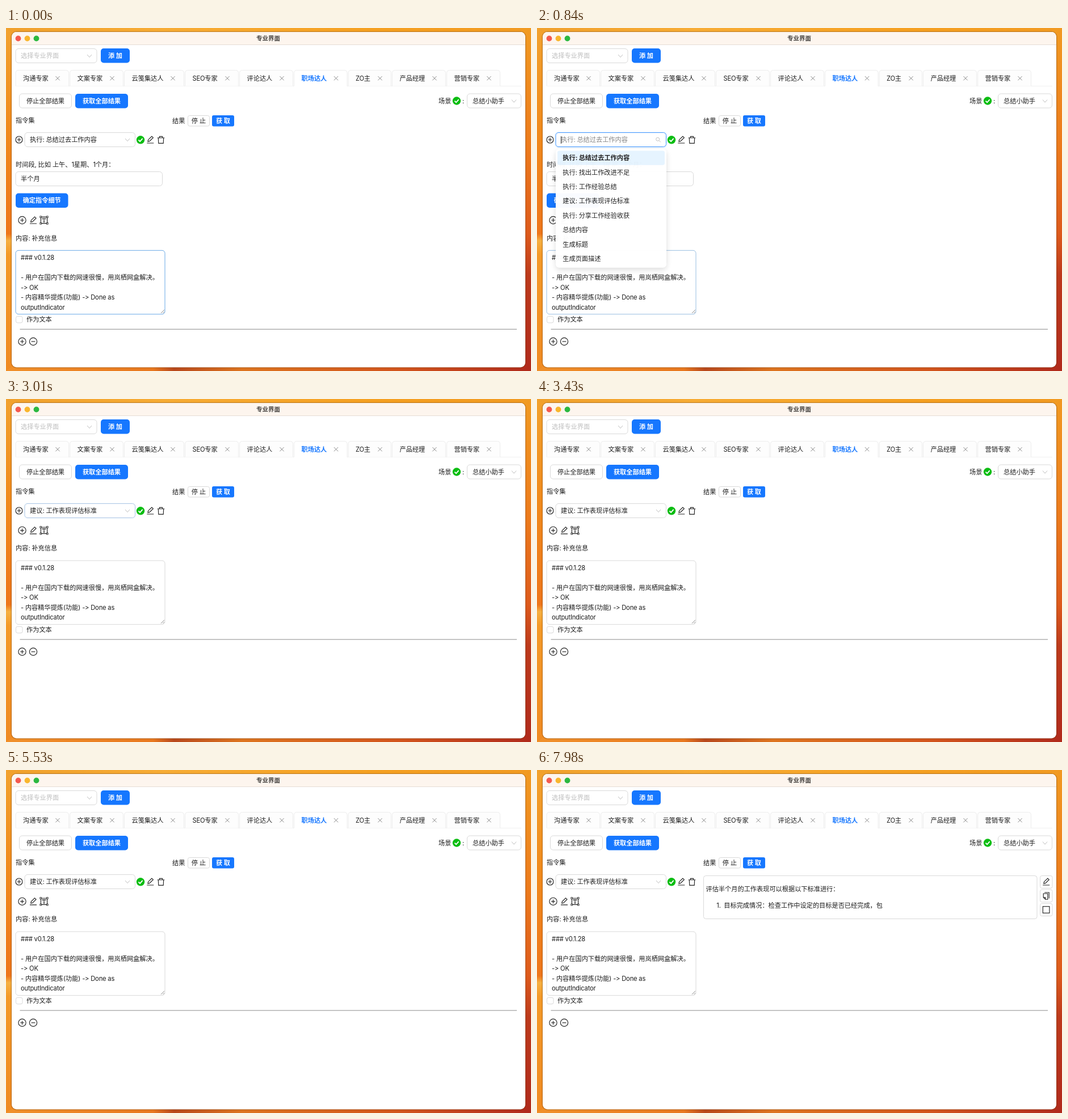
These frames come from a looping animation (925 by 605 pixels, 8000 ms). An HTML page:

```html
<!DOCTYPE html>
<html lang="zh-CN">
<head>
<meta charset="utf-8">
<style>
html, body { margin: 0; width: 100%; height: 100%; overflow: hidden; background: #f39a20; }
svg { display: block; width: 925px; height: 605px; }
text { font: 11.2px Inter, "Noto Sans CJK SC", "Noto Sans CJK", sans-serif; fill: #1c1c1c; white-space: pre; }
tspan { letter-spacing: -.2px; }
.b { font-weight: 700; }
.w { font-weight: 700; fill: #fff; }
.blue { font-weight: 700; fill: #1677ff; }
.dim { fill: #bfbfbf; }
.title { font-size: 10.5px; font-weight: 700; fill: #464340; }
.m { text-anchor: middle; }
.box { fill: #fff; stroke: #d9d9d9; }
.ln { fill: none; stroke: #222; stroke-width: 1.15; }
.thin { fill: none; stroke: #8a8a8a; stroke-width: 1; }
.pale { fill: none; stroke: #bfbfbf; stroke-width: 1; }
#menu { filter: drop-shadow(0 4px 5px rgba(0,0,0,.09)) drop-shadow(0 3px 8px rgba(0,0,0,.06)); }
</style>
</head>
<body>
<svg id="stage" viewBox="0 0 925 605"></svg>
<script>
const stage = document.getElementById('stage');
const LOOP = 8000, SHIFT = -107.2, BLUE = '#1677ff';

// Markup helpers: text takes its vertical centre, icons their centre point.
const text = (x, y, s, cls = '', id = '') =>
  `<text x="${x}" y="${y + 4.1}" class="${cls}" ${id && `id="${id}"`}>${runs(s)}</text>`;
const runs = s => s.replace(/[ -~]+/g, r => `<tspan>${r.replace('>', '&gt;')}</tspan>`);
const rect = (x, y, w, h, r, attrs = 'class="box"') =>
  `<rect x="${x}" y="${y}" width="${w}" height="${h}" rx="${r}" ${attrs}/>`;
const path = (d, cls = 'ln') => `<path d="${d}" class="${cls}"/>`;
const at = (x, y, s) => `<g transform="translate(${x} ${y})">${s}</g>`;
const button = (x, y, w, h, s, primary, r = 5) =>
  rect(x, y, w, h, r, primary ? `fill="${BLUE}"` : undefined) +
  text(x + w / 2, y + h / 2, s, primary ? 'w m' : 'm');

const ring = r => `<circle r="${r}" class="ln"/>`;
const plus = (x, y, r = 6.6) => at(x, y, ring(r) + path('M-3.4 0H3.4M0-3.4V3.4'));
const minus = (x, y) => at(x, y, ring(6.6) + path('M-3.4 0H3.4'));
const chevron = (x, y) => at(x, y, path('M-4-2L0 2.6L4-2', 'pale'));
const cross = (x, y) => at(x, y, path('M-3.6-3.6L3.6 3.6M3.6-3.6L-3.6 3.6', 'thin'));
const check = (x, y) => at(x, y, '<circle r="7.2" fill="#0bbd12"/>' +
  '<path d="M-3.5 .2L-.9 2.8L3.6-2.4" fill="none" stroke="#fff" stroke-width="1.8"/>');
const pencil = (x, y) => at(x, y, path('M-6 6H6M-4.3 3.2L-3.7 .2L2.6-6L5-3.6L-1.3 2.6Z'));
const trash = (x, y) => at(x, y, path('M-6.2-3.6H6.2M-2.6-3.8V-6H2.6V-3.8M-4.7-3.4L-4.2 6H4.2L4.7-3.4'));
const textIcon = (x, y) => at(x, y, path('M-5.6-5.6H5.6V5.6H-5.6ZM-2.8-1.6V-3H2.8V-1.6M0-3V3.2M-1.4 3.2H1.4') +
  [[-1, -1], [1, -1], [-1, 1], [1, 1]].map(([a, b]) =>
    rect(a * 5.8 - 1.3, b * 5.8 - 1.3, 2.6, 2.6, 0, 'fill="#fff" stroke="#222" stroke-width=".9"')).join(''));
const copy = (x, y) => at(x, y, path('M-3-6H5V4.5M-5-4H2.6V6.2H-1.4L-5 2.8ZM-5 2.8H-1.4V6.2'));

const gradient = (id, vertical, stops) =>
  `<linearGradient id="${id}" x1="0" y1="0" x2="${vertical ? 0 : 1}" y2="${vertical ? 1 : 0}">` +
  stops.map(([o, c]) => `<stop offset="${o}" stop-color="${c}"/>`).join('') + '</linearGradient>';

const wallpaper = () => '<defs>' +
  gradient('gt', 0, [[0, '#f0a02c'], [.3, '#f7ac35'], [.7, '#f5a021'], [1, '#f19a22']]) +
  gradient('gl', 1, [[0, '#f2a22e'], [.3, '#f08a1c'], [.6, '#ee761b'], [.62, '#f6b041'], [.66, '#f49a28'], [1, '#ef8a22']]) +
  gradient('gr', 1, [[0, '#f19a22'], [.35, '#ec7a1c'], [.6, '#dd5a1c'], [.72, '#bd3a1c'], [1, '#b02a1c']]) +
  gradient('gb', 0, [[0, '#f0902a'], [.28, '#e8781f'], [.32, '#b8481c'], [.45, '#dd741f'], [.75, '#d2541c'], [1, '#b02a1c']]) +
  '</defs>' +
  rect(0, 0, 925, 20, 0, 'fill="url(#gt)"') + rect(0, 590, 925, 15, 0, 'fill="url(#gb)"') +
  '<path d="M0 0L20 16V590L0 605Z" fill="url(#gl)"/><path d="M925 0L905 16V590L925 605Z" fill="url(#gr)"/>';

const frame = () =>
  rect(9.5, 6.5, 906, 592.5, 9, 'fill="none" stroke="#6b3a10" stroke-opacity=".35" stroke-width="1.5"') +
  rect(10, 7, 905, 591.5, 8.5, 'fill="#fff"') +
  '<path d="M10 30V15.5A8.5 8.5 0 0 1 18.500 7H906.500A8.5 8.5 0 0 1 915 15.500V30Z" fill="#fdf5ee"/>' +
  '<path d="M10 29.500H915" stroke="#e6ddd6"/>' +
  ['#f4594f', '#f9b62d', '#2bb840'].map((c, i) => `<circle cx="${21.5 + 16 * i}" cy="18.500" r="4.900" fill="${c}"/>`).join('') +
  text(462, 18, '专业界面', 'title m');

const tabList = [[17, 93.5, '沟通专家'], [112.5, 94, '文案专家'], [208.5, 105, '云笺集达人'], [315.5, 94, 'SEO专家'],
  [411.5, 94, '评论达人'], [507.5, 93.5, '职场达人'], [603, 75.5, 'ZO主'], [680.5, 94, '产品经理'], [776.5, 94, '营销专家']];
const tabs = () => path('M17 102.5H507.500M601 102.500H908', '" stroke="#f0f0f0') +
  tabList.map(([x, w, s]) => {
    const active = s === '职场达人';
    return `<path d="M${x} 102.500V79.500Q${x} 74.500 ${x + 5} 74.500H${x + w - 5}Q${x + w} 74.500 ${x + w} 79.500V102.500" ` +
      `fill="${active ? '#fff' : '#fdfdfd'}" stroke="#ececec"/>` +
      text(x + 13, 88.5, s, active ? 'blue' : '') + cross(x + w - 19.5, 88.7);
  }).join('');

const header = () =>
  rect(17, 36.5, 143, 25, 5) + text(26, 49, '选择专业界面', 'dim') + chevron(147, 49) +
  button(167, 36, 51, 25.5, '添 加', true) + tabs() +
  button(23.5, 116, 92, 25, '停止全部结果') + button(122, 116, 93, 25.5, '获取全部结果', true) +
  text(762, 128.5, '场景') + check(794, 128.5) + text(804, 128.5, ':') +
  rect(812.5, 116, 95, 25, 5) + text(822, 128.5, '总结小助手') + chevron(895, 128.5) +
  text(17, 163, '指令集') + text(293, 163.5, '结果') +
  button(320.5, 154.5, 38, 18.5, '停 止', false, 3) +
  rect(363, 154, 39, 19.5, 3, `id="wave" fill="${BLUE}"`) +
  button(363, 154, 39, 19.5, '获 取', true, 3);

const command = () => plus(23, 197, 6) +
  rect(32, 183.5, 196.5, 27.5, 6, 'id="glow" fill="none" stroke="#0591ff" stroke-width="2"') +
  rect(33, 184.5, 194.5, 25, 5, 'class="box" id="pick"') + text(42, 197, '', '', 'value') +
  rect(42, 191, 1, 13, 0, 'id="caret" fill="#222"') +
  `<g id="arrow">${chevron(214, 197)}</g>` +
  `<g id="find">${at(213.5, 197, '<circle cx="-.8" cy="-.8" r="3" class="pale"/>' + path('M1.500 1.500L4.300 4.300', 'pale'))}</g>` +
  check(237, 197.3) + pencil(254.3, 197) + trash(273, 197.3);

const period = () => `<g id="period">` + text(17, 240.5, '时间段, 比如 上午、1星期、1个月：') +
  rect(17, 253.5, 258.5, 25, 5) + text(26, 266, '半个月') +
  button(17, 291.5, 92.5, 25.5, '确定指令细节', true) + '</g>';

const notes = ['### v0.1.28', '', '- 用户在国内下载的网速很慢，用岚栖网盒解决。', '-> OK',
  '- 内容精华提炼(功能) -> Done as', 'outputIndicator'];
const content = () => '<g id="content">' + plus(28.5, 339) + pencil(48, 339) + textIcon(67, 339) +
  text(17, 370.5, '内容: 补充信息') + rect(17, 392.3, 263, 112.5, 5, 'class="box" id="area"') +
  notes.map((s, i) => text(26, 405 + 17.5 * i, s)).join('') +
  path('M273 503L279 497M276.500 503L279 500.500', 'thin') +
  rect(17.5, 508.5, 11.5, 11.5, 3) + text(36, 514.3, '作为文本') +
  path('M24.5 531.300H900', 'thin') + plus(28.5, 553) + minus(48, 553) + '</g>';

const options = ['执行: 总结过去工作内容', '执行: 找出工作改进不足', '执行: 工作经验总结', '建议: 工作表现评估标准',
  '执行: 分享工作经验收获', '总结内容', '生成标题', '生成页面描述'];
const menu = () => '<g id="menu">' + rect(33, 213.2, 195, 210.6, 6, 'fill="#fff"') +
  rect(36, 216.4, 189, 25.5, 3.5, 'fill="#e6f4ff"') +
  rect(36, 292.9, 189, 25.5, 3.5, 'id="hover" fill="#f4f4f4"') +
  options.map((s, i) => text(45.3, 229.2 + 25.52 * i, s, i ? '' : 'b')).join('') + '</g>';

const result = () => '<g id="result">' + rect(293.5, 186.5, 587.5, 76, 4, 'class="box" id="panel"') +
  text(297.5, 210, '', '', 'intro') + text(316.3, 238.8, '1.', '', 'bullet') + text(329.3, 238.8, '', '', 'item') +
  [186.5, 211, 235.5].map(y => rect(886.5, y, 21.5, 22, 3)).join('') +
  pencil(897.2, 197) + copy(897.2, 222) + rect(891.3, 240.7, 11.6, 11.6, 0, 'class="ln"') + '</g>';

stage.innerHTML = wallpaper() + frame() + header() + command() + period() + content() + menu() + result();
const el = {};
stage.querySelectorAll('[id]').forEach(n => el[n.id] = n);

const ramp = (t, a, b) => Math.min(1, Math.max(0, (t - a) / (b - a)));
const quint = p => 1 - (1 - p) ** 5;
const circ = p => Math.sqrt(1 - (1 - p) ** 2);
const mix = (a, b, p) => `rgb(${a.map((v, i) => Math.round(v + (b[i] - v) * p))})`;
const GREY = [217, 217, 217], FOCUS = [64, 150, 255], SOFT = [105, 168, 230], INK = [28, 28, 28], FAINT = [191, 191, 191];
const show = (n, on) => n.setAttribute('display', on ? 'inline' : 'none');
const write = (n, s) => { if (n.dataset.s !== s) { n.dataset.s = s; n.innerHTML = runs(s); } };

// Streamed text: each step gives the time and the letters present from then on.
const intro = '评估半个月的工作表现可以根据以下标准进行：';
const item = '目标完成情况：检查工作中设定的目标是否已经完成，包';
const introSteps = [[5880, 2], [5950, 3], [6020, 5], [6090, 6], [6160, 8], [6230, 10],
  [6370, 12], [6440, 14], [6510, 16], [6580, 18], [6650, 20], [6720, 21]];
const itemSteps = [[6930, 2], [7000, 3], [7070, 4], [7140, 6], [7280, 7], [7350, 9],
  [7490, 11], [7560, 14], [7630, 17], [7700, 20], [7910, 22], [7980, 25]];
const typed = (s, steps, t) => s.slice(0, steps.reduce((n, [at, k]) => t >= at ? k : n, 0));

function draw(t) {
  const open = t >= 700 && t < 2590, moved = t >= 2870;

  const lit = ramp(t, 350, 550) * (1 - ramp(t, 2870, 3070));
  const focus = ramp(t, 700, 900) * (1 - ramp(t, 2870, 3070));
  el.pick.style.stroke = mix(GREY, FOCUS, lit);
  el.glow.setAttribute('opacity', .1 * focus);
  write(el.value, options[t < 2590 ? 0 : 3]);
  el.value.style.fill = open ? mix(INK, FAINT, ramp(t, 700, 920)) : mix(INK, INK, 0);
  show(el.arrow, !open);
  show(el.find, open);
  show(el.caret, open && Math.floor((t - 700) / 560) % 2 === 0);

  const grow = quint(ramp(t, 735, 935)), leave = ramp(t, 2570, 2660);
  const scale = (.8 + .2 * grow) * (1 - .2 * leave ** 3);
  show(el.menu, grow > 0 && leave < 1);
  el.menu.setAttribute('transform', `translate(0 ${213.2 * (1 - scale)}) scale(1 ${scale})`);
  el.menu.setAttribute('opacity', grow * (1 - leave ** 2));
  show(el.hover, t >= 910);

  show(el.period, !moved);
  el.content.setAttribute('transform', `translate(0 ${moved ? SHIFT : 0})`);
  const pass = ramp(t, 3440, 3640) * (1 - ramp(t, 3720, 3920));
  el.area.style.stroke = mix(GREY, SOFT, Math.max(1 - ramp(t, 740, 980), pass));

  const spread = 4.8 * circ(ramp(t, 4130, 4530));
  for (const [k, v] of [['x', 363 - spread], ['y', 154 - spread], ['width', 39 + 2 * spread], ['height', 19.5 + 2 * spread], ['rx', 3 + spread]])
    el.wave.setAttribute(k, v);
  el.wave.setAttribute('opacity', .2 * (1 - circ(ramp(t, 4130, 4900))));

  show(el.result, t >= 5880);
  el.panel.setAttribute('height', t < 6790 ? 47.4 : 76);
  show(el.bullet, t >= 6790);
  write(el.intro, typed(intro, introSteps, t));
  write(el.item, typed(item, itemSteps, t));
}

const start = performance.now();
function tick() {
  draw((performance.now() - start) % LOOP);
  requestAnimationFrame(tick);
}
tick();
</script>
</body>
</html>
```
